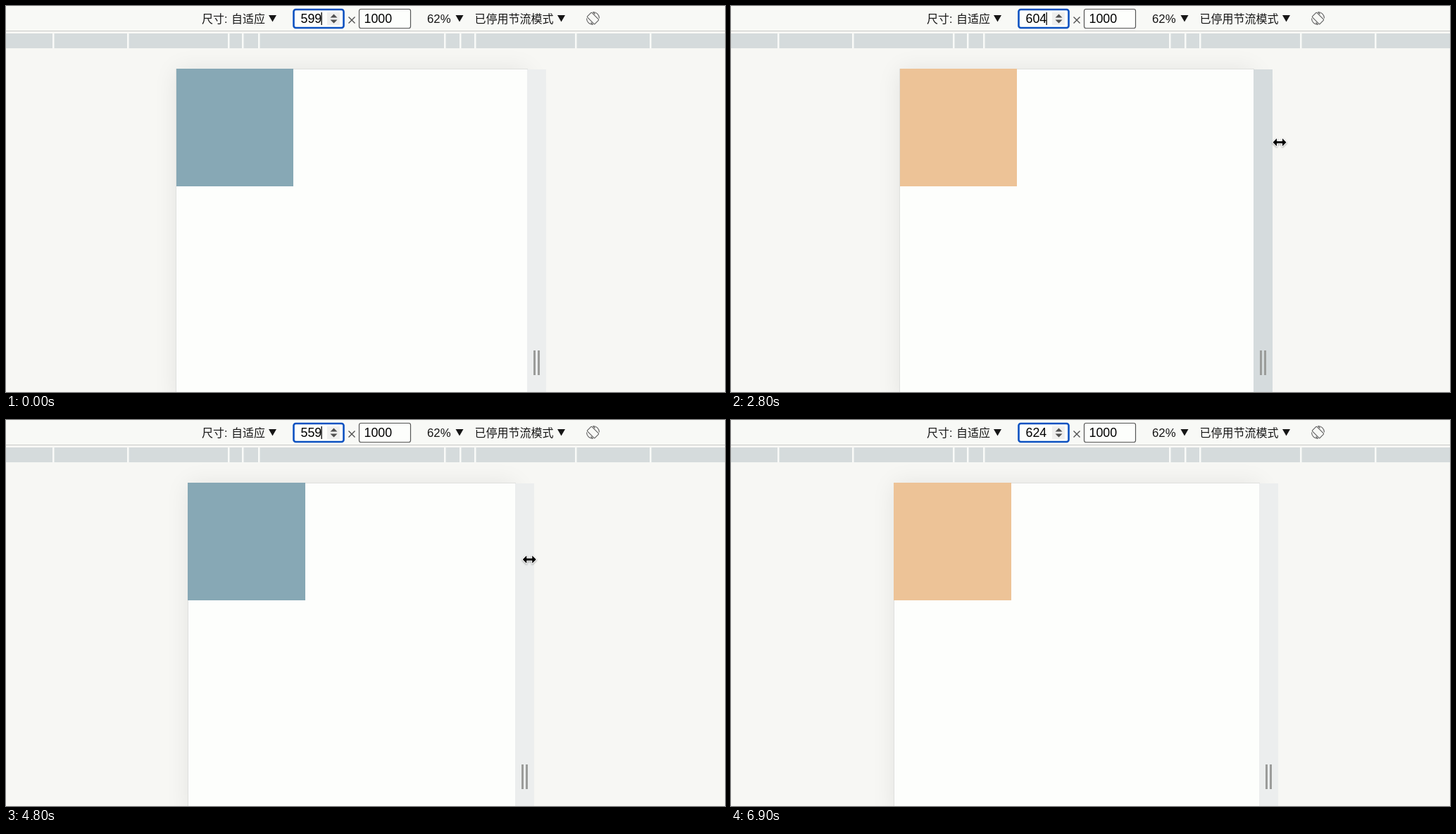
Write an HTML page that moves like this. It is 1021x548 px and loops after 7 s.

```html
<!DOCTYPE html>
<html lang="zh">
<head>
<meta charset="utf-8">
<style>
  html, body { margin: 0; width: 100%; height: 100%; overflow: hidden; background: #f7f7f4; }
  #stage { position: relative; width: 1021px; height: 548px; overflow: hidden; }
  #stage > * { position: absolute; }
  #page {
    top: 90px; height: 470px; background: #fdfefc;
    box-shadow: 0 0 0 1px #dfe0de, 0 1px 32px rgba(0, 0, 0, .085);
  }
  #box { left: -.5px; top: -.6px; width: 166.8px; height: 166.6px; position: absolute; }
  #grip { top: 90px; width: 27px; height: 458px; background: #eceeee; }
  #grip.hover { background: #d5dbdd; }
  #grip::before, #grip::after {
    content: ""; position: absolute; top: 399px; width: 3px; height: 35px; background: #9b9c9a;
  }
  #grip::before { left: 9.2px; }
  #grip::after { left: 14.8px; }
  svg { left: 0; top: 0; }
  text { font: 16px "Liberation Sans", "Noto Sans CJK SC", "Noto Sans CJK", sans-serif; fill: #161616; }
  .num { font-size: 17.8px; fill: #000; }
  #cursor { filter: drop-shadow(0 1px 1px rgba(0, 0, 0, .35)); }
</style>
</head>
<body>
<div id="stage">
  <div id="page"><div id="box"></div></div>
  <div id="grip"></div>
  <svg width="1021" height="548" viewBox="0 0 1021 548">
    <path fill="#f8f9f6" d="M0 0H1021V36H0Z"/>
    <path fill="#c8c9c7" d="M0 35H1021V36H0Z"/>
    <path fill="#d5dbdc" d="M0 39H1021V60H0Z"/>
    <g id="ticks" fill="#f9faf8"></g>

    <text x="278" y="24">尺寸:</text>
    <text x="320" y="24">自适应</text>
    <text x="598" y="23.5" style="font-size:16.8px">62%</text>
    <text x="665.5" y="24">已停用节流模式</text>
    <path fill="#161616" d="M373 13h11l-5.5 9.5zM638.5 13h11l-5.5 9.5zM783 13h11l-5.5 9.5z"/>

    <rect x="408.5" y="5" width="71" height="26" rx="3" fill="#fdfefc" stroke="#0b51c1" stroke-width="2.6"/>
    <rect x="501.5" y="4.5" width="73" height="27" rx="2.5" fill="#fdfefc" stroke="#565656" stroke-width="1.2"/>
    <text id="value" class="num" x="418.5" y="24.3"></text>
    <text class="num" x="508.5" y="24.3">1000</text>
    <path id="caret" fill="#000" d="M447.5 9h1.3v18h-1.3z"/>
    <path fill="#efefee" d="M456 9h18v18h-18z"/>
    <path fill="#505050" d="M460.5 16.5h10l-5-5zM460.5 19.5h10l-5 5z"/>
    <path stroke="#505050" stroke-width="1.4" d="M486.5 15.5l9 9M495.500 15.500l-9 9"/>

    <g transform="translate(833.5 17.5)" fill="none" stroke="#606060" stroke-width="1.1">
      <rect x="-4.5" y="-7.5" width="9" height="15" rx="1" transform="rotate(-45)"/>
      <path d="M0 -9A9 9 0 0 1 9 0M0 -9L3 -6M0 9A9 9 0 0 1 -9 0M0 9L-3 6"/>
    </g>

    <g id="cursor" stroke="#fff" stroke-width="2" stroke-linejoin="round" paint-order="stroke">
      <path id="resize" d="M-9.5 0L-4 -5.500V-1.500H4V-5.500L9.500 0L4 5.500V1.500H-4V5.500Z"/>
      <path id="arrow" d="M0 0V15L3.500 11.800L6 17.500L8.500 16.500L6 10.800H10.700Z"/>
    </g>
  </svg>
</div>
<script>
const $ = id => document.getElementById(id);
const LOOP = 7000, STEP = 100, MID = 491, SCALE = .4155;

$("ticks").innerHTML = [66, 172, 315, 335, 358, 622, 644, 665, 808, 914]
  .map(x => `<path d="M${x} 39h2.5v21h-2.5z"/>`).join("");

const linear = p => p, smooth = p => p * p * (3 - 2 * p);

// Value at t along [time, value] stops
function along(stops, t, ease) {
  let i = 0;
  while (i < stops.length - 2 && t >= stops[i + 1][0]) i++;
  const [a, va] = stops[i], [b, vb] = stops[i + 1];
  return va + (vb - va) * ease(Math.min(1, Math.max(0, (t - a) / (b - a))));
}

const typed = [300, 700, 1700, 2100, 2500];
const drag = [[3000, 604], [3800, 620], [4800, 559], [6440, 624]];
const approach = [[2300, 1024], [2800, 779], [3000, 762]];
const drift = [[2300, 190], [2800, 193.5], [3800, 194.5], [4800, 198], [6100, 204.5]];
const slip = [[4800, 6.5], [6100, 8]];

const widthAt = t => t < 3000
  ? 599 + typed.filter(s => t >= s).length
  : Math.round(along(drag, t, smooth));

// The caret restarts its blink whenever the value changes
function caretOn(t) {
  let since = t;
  while (since > 0 && widthAt(since - STEP) === widthAt(t)) since -= STEP;
  return (t - since) % 1000 < 500;
}

const show = (id, on) => { $(id).style.display = on ? "" : "none"; };

function draw(t) {
  const w = widthAt(t), half = w * SCALE, right = MID + half;
  $("page").style.left = MID - half + "px";
  $("page").style.width = 2 * half + "px";
  $("box").style.background = w <= 600 ? "#87a8b5" : "#edc397";
  $("grip").style.left = right + "px";
  $("grip").className = t >= 2700 && t < 3000 ? "hover" : "";
  $("value").textContent = w;
  show("caret", caretOn(t));

  const x = t < 3000 ? along(approach, t, linear) : right + 13.5 + along(slip, t, linear);
  show("cursor", t >= 2400 && t < 6500);
  show("arrow", t < 2700);
  show("resize", t >= 2700);
  $("cursor").setAttribute("transform", `translate(${x} ${along(drift, t, linear)})`);
}

const start = performance.now();
function tick() {
  const t = (performance.now() - start) % LOOP;
  draw(Math.floor(t / STEP) * STEP);
  requestAnimationFrame(tick);
}
tick();
</script>
</body>
</html>
```
